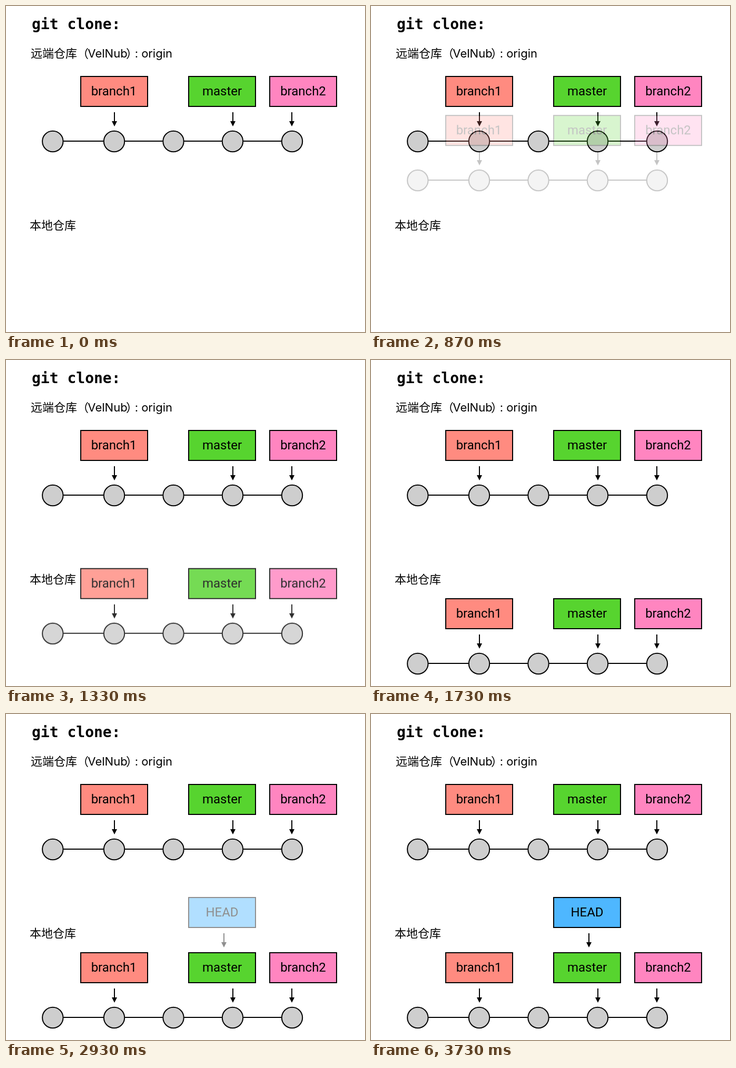
These frames come from a looping animation (682 px wide and 620 px high, 4.2 s). An HTML page:

```html
<!DOCTYPE html>
<html lang="zh-CN">
<head>
<meta charset="utf-8">
<title>git clone</title>
<style>
  html, body { margin: 0; width: 100%; height: 100%; overflow: hidden; background: #fff; }
  svg { display: block; width: 682px; height: 620px; }
  .title { font: bold 28px "DejaVu Sans Mono", monospace; }
  .note { font: 22px Inter, "Noto Sans CJK SC", "Noto Sans CJK", sans-serif; }
  .label { font: 24px Roboto, sans-serif; text-anchor: middle; }
  .box, .commit, .line { stroke: #000; stroke-width: 2; }
  .commit { fill: #cecece; }
</style>
</head>
<body>
<svg viewBox="0 0 682 620">
  <defs>
    <rect id="box" class="box" width="127" height="57"/>
    <circle id="commit" class="commit" cy="257.5" r="19.7"/>
    <g id="arrow">
      <path class="line" d="M0 202V221"/>
      <path d="M-5 219H5L0 229Z"/>
    </g>
  </defs>

  <text class="title" x="49" y="44">git clone:</text>
  <g class="note">
    <text x="47" y="98">远端仓库（</text>
    <text x="193" y="98" text-anchor="middle">VelNub</text>
    <text x="228" y="98">）</text>
    <text x="316" y="98" text-anchor="end">: origin</text>
  </g>

  <g id="repo">
    <use href="#box" x="142" y="134" fill="#ff8b80"/>
    <use href="#box" x="347" y="134" fill="#57d42f"/>
    <use href="#box" x="501" y="134" fill="#ff85c0"/>
    <g class="label">
      <text x="205" y="170">branch1</text>
      <text x="410.5" y="170">master</text>
      <text x="564.5" y="170">branch2</text>
    </g>
    <use href="#arrow" x="206"/>
    <use href="#arrow" x="431"/>
    <use href="#arrow" x="543"/>
    <path class="line" d="M89 257H543"/>
    <use href="#commit" x="88.8"/>
    <use href="#commit" x="205.5"/>
    <use href="#commit" x="318"/>
    <use href="#commit" x="430.5"/>
    <use href="#commit" x="543.5"/>
  </g>

  <g id="clone" opacity="0"><use href="#repo"/></g>

  <g id="head" opacity="0">
    <use href="#box" x="347" y="349" fill="#4eb7ff"/>
    <text class="label" x="410.5" y="385">HEAD</text>
    <use href="#arrow" x="414" y="215"/>
  </g>

  <text class="note" x="45" y="425">本地仓库</text>
</svg>
<script>
  const LOOP = 4200, FPS = 15, DROP = 320;
  const clone = document.getElementById('clone');
  const head = document.getElementById('head');

  // cubic-bezier(.42, 0, .58, 1), solved by bisection
  function easeInOut(x) {
    if (x <= 0) return 0;
    if (x >= 1) return 1;
    let lo = 0, hi = 1;
    for (let i = 0; i < 24; i++) {
      const s = (lo + hi) / 2;
      if (1.26 * s - 0.78 * s * s + 0.52 * s * s * s < x) lo = s;
      else hi = s;
    }
    return lo * lo * (3 - 2 * lo);
  }

  const progress = (t, start, length) => easeInOut((t - start) / length);

  function draw(now) {
    // Motion advances in 15 fps steps; the 4 ms absorbs rounded step times
    const t = Math.floor((now % LOOP + 4) * FPS / 1000) * 1000 / FPS % LOOP;
    const p = progress(t, 450, 1250);
    clone.setAttribute('transform', `translate(0 ${p * DROP})`);
    clone.setAttribute('opacity', p);
    head.setAttribute('opacity', progress(t, 2600, 720));
  }

  const begin = performance.now();
  function tick() {
    draw(performance.now() - begin);
    requestAnimationFrame(tick);
  }
  tick();
</script>
</body>
</html>
```
